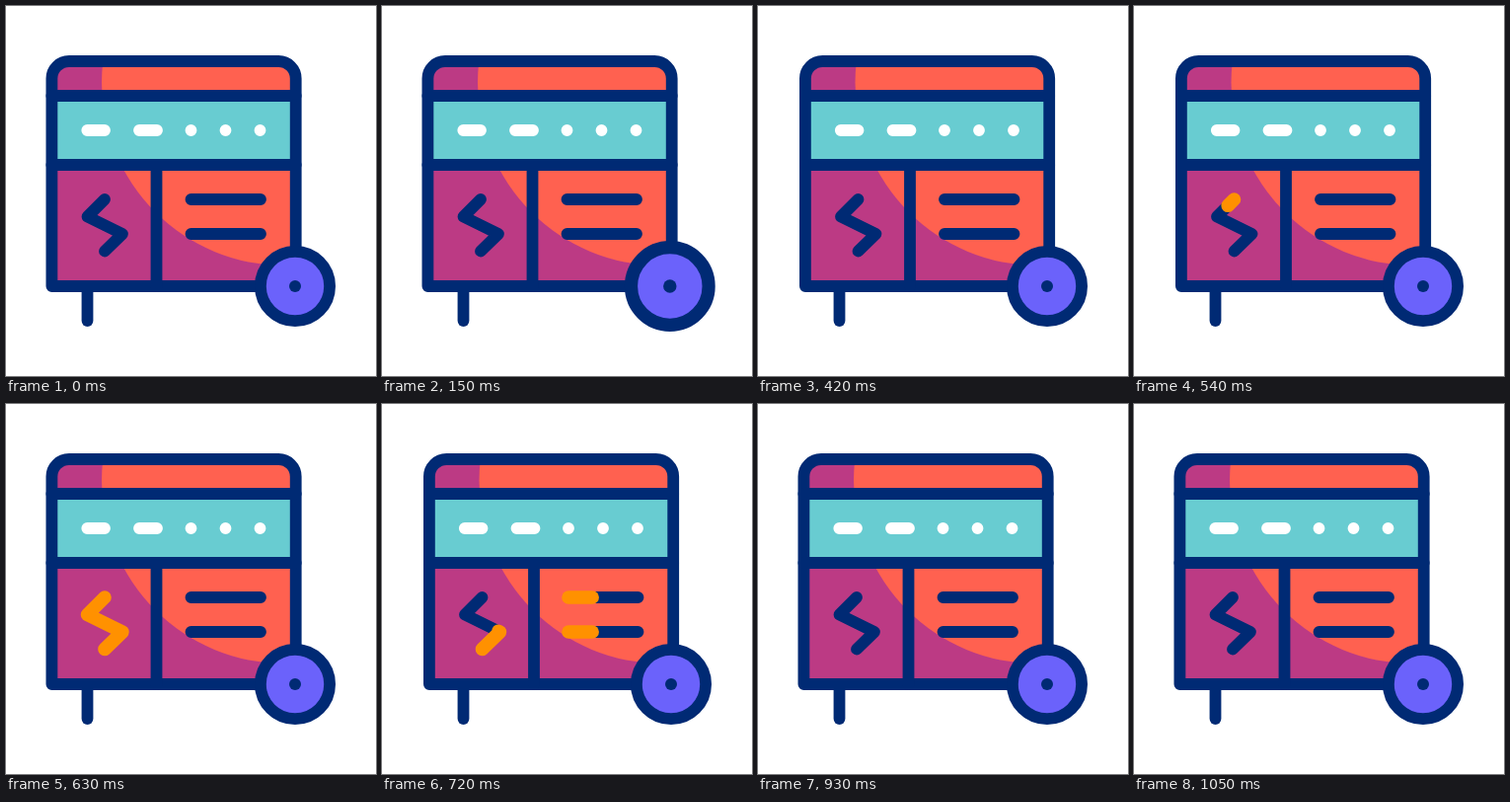
Animation of 375 by 375 pixels, one loop 1.11 s. Source, as an HTML page:

```html
<!DOCTYPE html>
<html lang="en">
<head>
<meta charset="utf-8">
<title>Generator</title>
<style>
  html, body { margin: 0; width: 100%; height: 100%; overflow: hidden; background: #fff; }
  svg { display: block; width: 100vw; height: 100vh; }
  .line { fill: none; stroke: #002a74; stroke-width: 11.8; stroke-linecap: round; stroke-linejoin: round; }
  .white { stroke: #fff; }
  .glow { stroke: #ff9100; stroke-width: 13.6; }
</style>
</head>
<body>
<svg viewBox="0 0 375 375">
  <defs>
    <path id="shell" d="M46.4 284V73.5A17.5 17.5 0 0 1 63.9 56H276.2A17.5 17.5 0 0 1 293.7 73.5V284Z"/>
    <clipPath id="inside"><use href="#shell"/></clipPath>
  </defs>
  <path class="line" d="M82.5 284V319"/>
  <g id="body">
    <g clip-path="url(#inside)">
      <rect x="40" y="50" width="262" height="240" fill="#bc3a84"/>
      <circle cx="282" cy="78" r="185" fill="#ff6150"/>
      <rect x="40" y="91" width="262" height="70" fill="#68ccd1"/>
    </g>
    <use href="#shell" class="line"/>
    <path class="line" d="M46.4 91H293.7M46.4 161H293.7M152.5 161V284"/>
    <path class="line white" d="M82.3 126H100M135 126H153M187.5 126h.01M222.5 126h.01M257.5 126h.01"/>
    <path class="line" d="M100 196L82.5 213.5L118 231L100 248.5M187.5 196H258M187.5 231H258"/>
    <path class="line glow bolt" pathLength="1" d="M100 196L82.5 213.5L118 231L100 248.5"/>
    <path class="line glow bar" pathLength="1" d="M187.5 196H258.5"/>
    <path class="line glow bar" pathLength="1" d="M187.5 231H258.5"/>
  </g>
  <g id="wheel">
    <circle class="line" r="35.1" style="fill:#6b62fb"/>
    <circle r="6" fill="#002a74"/>
  </g>
</svg>
<script>
  const LOOP = 1110, STEP = 30;
  const SWEEP = 100, LAG = 120;
  const body = document.getElementById('body');
  const wheel = document.getElementById('wheel');
  const tracks = [
    { paths: document.querySelectorAll('.bolt'), starts: [152, 530] },
    { paths: document.querySelectorAll('.bar'), starts: [159, 686] }
  ];
  const clamp = v => Math.max(0, Math.min(1, v));

  // The tail follows the head along the path after a fixed lag.
  function sweep({ paths, starts }, t) {
    const start = starts.find(s => t > s && t < s + LAG + SWEEP);
    for (const path of paths) {
      path.style.display = start === undefined ? 'none' : '';
      if (start === undefined) continue;
      const head = clamp((t - start) / SWEEP);
      const tail = clamp((t - start - LAG) / SWEEP);
      path.setAttribute('stroke-dasharray', `${head - tail} 2`);
      path.setAttribute('stroke-dashoffset', -tail);
    }
  }

  function draw(ms) {
    let tick = Math.min(35, Math.floor((ms % LOOP) / STEP));
    if (tick < 2) tick = 0;
    const t = tick * STEP;

    const shake = tick > 0 && tick % 2 === 0 ? 1.5 : 0;
    body.setAttribute('transform', `translate(${shake} 0)`);

    const pulse = Math.sin(Math.PI * clamp((t - 30) / 250)) ** 2;
    wheel.setAttribute('transform',
      `translate(${293 - 1.2 * pulse} 284) scale(${1 + 0.12 * pulse})`);

    tracks.forEach(track => sweep(track, t));
  }

  const begin = performance.now();
  function frame() {
    draw(performance.now() - begin);
    requestAnimationFrame(frame);
  }
  frame();
</script>
</body>
</html>
```
